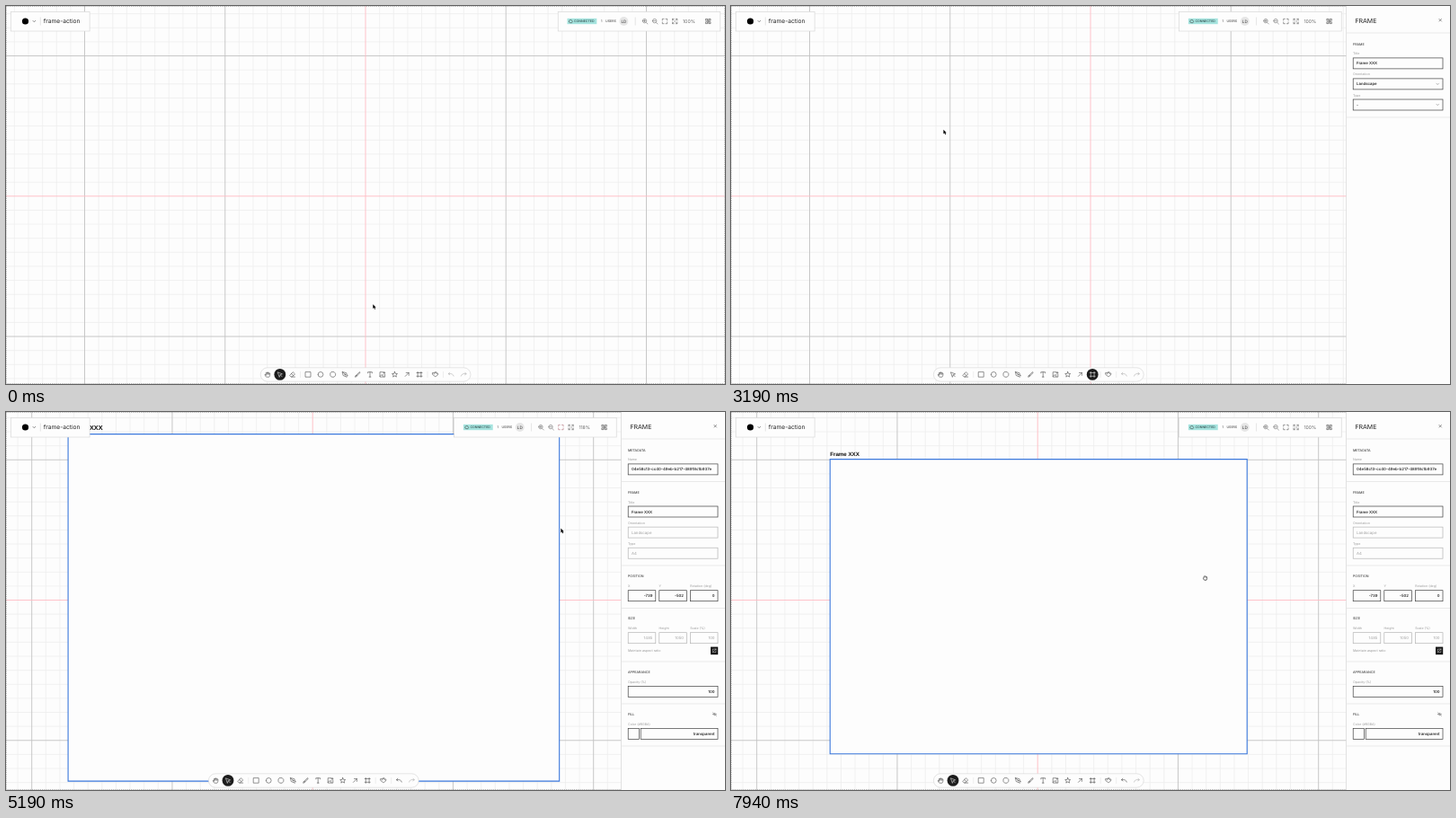
Animation of 800x421 px, one loop 8 s. Source, as an HTML page:

```html
<!DOCTYPE html>
<html lang="en">
<head>
<meta charset="utf-8">
<title>Frame action</title>
<style>
  html, body { margin: 0; width: 100%; height: 100%; overflow: hidden; background: #fdfdfd; }
  svg { display: block; width: 100vw; height: 100vh; }
  text { font-family: Inter, "Open Sans", sans-serif; text-rendering: geometricPrecision; white-space: pre; }
  .icon { fill: none; stroke-width: .52; stroke-linecap: round; stroke-linejoin: round; }
</style>
</head>
<body>
<svg id="stage" viewBox="0 0 800 421"></svg>
<script>
const LOOP = 8000;
const OPEN = 1940, PLACE = 3880, FIT = 5060, ZOOM_OUT = 7370, GRAB = 7940;
const DARK = '#333', GREY = '#9a9a9a', EDGE = '#d2d2d2', PAPER = '#fdfdfd';
const CELL = 15.625, FIT_SCALE = 1.178;

const text = (x, y, s, size, fill = DARK, extra = '') =>
  `<text x="${x}" y="${y + size * .36}" font-size="${size}" fill="${fill}" ${extra}>${s}</text>`;
const box = (x, y, w, h, stroke = EDGE, fill = PAPER, sw = .6, r = 0) =>
  `<rect x="${x}" y="${y}" width="${w}" height="${h}" rx="${r}" fill="${fill}" stroke="${stroke}" stroke-width="${sw}"/>`;
const line = (d, stroke = EDGE, sw = .6) => `<path d="${d}" fill="none" stroke="${stroke}" stroke-width="${sw}"/>`;
const icon = (x, y, d, stroke = DARK, id = '') =>
  `<path ${id && `id="${id}"`} class="icon" transform="translate(${x} ${y})" stroke="${stroke}" d="${d}"/>`;
const group = (id, body) => `<g id="${id}">${body}</g>`;

// Canvas grid, centred on the origin
function grid() {
  let minor = '', major = '';
  for (let i = -60; i <= 60; i++) {
    if (!i) continue;
    const p = i * CELL, d = `M${p} -900V900M-900 ${p}H900`;
    if (i % 10) minor += d; else major += d;
  }
  return line(minor, '#eee', .8) + line(major, '#c2c2c2', .9) + line('M0 -900V900M-900 0H900', '#ffbcc3', .9);
}

const frame =
  `<rect x="-231" y="-156.9" width="464" height="328.1" fill="${PAPER}" stroke="#3a77dc" stroke-width="1.1" vector-effect="non-scaling-stroke"/>
   <text x="-231" y="-160.8" font-size="6.2" font-weight="700" fill="#111" style="font-family:'Liberation Sans',sans-serif">Frame XXX</text>`;

const ring = r => `M${-r} 0a${r} ${r} 0 1 0 ${2 * r} 0a${r} ${r} 0 1 0 ${-2 * r} 0`;
const lens = 'M1.7 1.7L3 3M-2.6 -.4a2.2 2.2 0 1 0 4.4 0a2.2 2.2 0 1 0 -4.4 0M-1.4 -.4H.6';
const corners = 'M-2.7 -1V-2.7H-1M1 -2.7H2.7V-1M2.7 1V2.7H1M-1 2.7H-2.7V1';

const tools = [
  [291, 'M-1.7 .6L-2.8 -.2C-3.3 .4 -2.2 2 -1.4 2.8H1.8C2.7 1.8 2.8 .2 2.7 -1.4Q2.2 -2 1.7 -1.4V0M-1.7 .6V-2Q-1.2 -2.6 -.6 -2V-.2M-.6 -2Q0 -3.4 .6 -2.3V-.2M.6 -2.2Q1.3 -2.7 1.7 -1.6'],
  [304.8, 'M-2.2 -2.4L2.6 -.6L.4 .3L-.5 2.6ZM.5 .5L2.3 2.4'],
  [318.7, 'M-2.8 .8L.5 -2.7L2.8 -.5L-.3 2.6H-1.2ZM-1.2 -.9L1.1 1.3M-1 2.7H2.8'],
  [336.2, 'M-2.8 -2.8H2.8V2.8H-2.8Z'],
  [350, ring(2.9)],
  [363.7, 'M-1.4 -2.8H1.4L2.9 -1V1L1.4 2.8H-1.4L-2.9 1V-1Z'],
  [377.3, 'M-2.8 -2.8L1.3 -1.8L2.2 .7L.7 2.2L-1.8 1.3ZM-2.8 -2.8L0 0M2.4 .9L3 1.6L1.6 3L.9 2.4M-.2 .1a.5 .5 0 1 0 1 0a.5 .5 0 1 0 -1 0'],
  [391.2, 'M-1.2 .6L2 -2.7Q3 -2.8 2.7 -1.8L-.5 1.3ZM-1.4 .8Q-2.6 .8 -2.8 2.8Q-.8 2.8 -.6 1.5'],
  [405, 'M-2.4 -1.6V-2.7H2.4V-1.6M0 -2.7V2.7M-.9 2.7H.9'],
  [418.8, 'M.6 -2.7H-2.8V2.7H2.8V-.4M-2.6 2L-.9 .2L1.4 2.6M2 -3V-1M1 -2H3M.4 .4H1'],
  [432.5, 'M0 -3L.9 -1L3 -.8L1.4 .6L1.9 2.7L0 1.6L-1.9 2.7L-1.4 .6L-3 -.8L-.9 -1Z'],
  [446.2, 'M-2 2L2 -2M-1 -2H2V1'],
  [460, 'M-1.9 -3V3M1.9 -3V3M-3 -1.9H3M-3 1.9H3'],
  [477.7, 'M-2.9 -1.8H.6L2.9 .2L.6 2.2H-.4L-2.9 .2ZM-1.6 -.6H-1.2M-.6 -2.6H1.4L3.2 -.6'],
  [495.2, 'M-1.6 -2.2L-2.9 -.7L-1.4 .4M-2.8 -.7Q2 -1.8 2.9 1.7'],
  [509.2, 'M1.6 -2.2L2.9 -.7L1.4 .4M2.8 -.7Q-2 -1.8 -2.9 1.7']
];
const SELECT = 1, FRAME = 12, UNDO = 14, REDO = 15;

const toolbar =
  box(283.2, 402.8, 233.8, 15.4, EDGE, PAPER, .6, 7.7) +
  line('M327.5 407V414M469 407V414M486.5 407V414', '#dedede', .5) +
  `<circle id="hover" cx="460" cy="410.5" r="6" fill="#e4e4e4"/><circle id="active" cy="410.4" r="6.4" fill="#1c1c1c"/>` +
  tools.map(([x, d], i) => icon(x, 410.4, d, DARK, 'tool' + i)).join('');

const nameBar =
  box(5.5, 6.3, 87.6, 21.7) +
  `<circle cx="21.5" cy="17" r="3.6" fill="#000"/>` +
  icon(31.3, 17, 'M-1.4 -.7L0 .8L1.4 -.7') + line('M38.3 12.5V21.5', '#d4d4d4') +
  text(41.8, 17, 'frame-action', 6.65, '#222');

const statusBar =
  box(614.2, 6.3, 180.6, 21.7) +
  `<rect x="624.5" y="13.8" width="32.8" height="6.4" fill="#a5e3de"/>` +
  icon(628.4, 17, 'M-1.3 1.5Q-2.4 1.2 -2 -.1Q-1.5 -1.7 0 -1.6Q1.4 -1.5 1.5 -.2Q2.6 .8 1.4 1.5Z') +
  text(632, 17, 'CONNECTED', 3.55, '#2d4a4a', 'font-weight="500"') +
  text(662, 17, '1', 3.6) + text(667, 17, 'USERS', 3.6) +
  `<circle cx="687.4" cy="17" r="4.9" fill="#e6e6e6"/>` +
  text(687.4, 17, 'LD', 4.6, '#333', 'text-anchor="middle"') +
  line('M700.2 12.5V21.5', '#d4d4d4') +
  icon(710.9, 17, lens + 'M-.4 -1.4V.6', '#555') + icon(722, 17, lens, '#555') +
  icon(733, 17, corners, '#444', 'fitIcon') +
  icon(744.2, 17, corners + 'M-2.5 -2.5L-.7 -.7M2.5 -2.5L.7 -.7M2.5 2.5L.7 .7M-2.5 2.5L-.7 .7', '#555') +
  text(753, 17, '100%', 5.2, '#666', 'id="percent"') +
  icon(781.4, 17, 'M-2.6 -2.6H-.8V-.8H-2.6ZM.8 -2.6H2.6V-.8H.8ZM.8 .8H2.6V2.6H.8ZM-2.6 .8H-.8V2.6H-2.6ZM-.8 -.8L.8 .8M.8 -.8L-.8 .8');

const tooltip = (id, x, y, label, key) => group(id,
  box(x, y, 35.6, 9.6) + text(x + 4, y + 4.9, label, 3.9, '#444') +
  text(x + 31.6, y + 4.9, key, 3.7, GREY, 'text-anchor="end"'));

// Side panel parts
const head = (y, s) => text(692, y, s, 3.7, '#222');
const rule = y => line(`M685 ${y}H800`, '#dcdcdc');
function field(x, w, y, label, value, { off, right, select } = {}) {
  const ink = off ? '#a2a2a2' : '#111';
  const style = (right ? 'text-anchor="end" ' : '') + (off ? '' : 'font-weight="500"');
  return text(x, y, label, 3.6, GREY) +
    box(x + .2, y + 4.7, w - .4, 12, off ? '#b0b0b0' : DARK, PAPER, .65) +
    text(right ? x + w - 3.6 : x + 4, y + 10.7, value, 4.32, ink, style) +
    (select ? icon(x + w - 6, y + 10.7, 'M-1.3 -.7L0 .7L1.3 -.7', '#777') : '');
}
const full = (y, label, value, opt) => field(692, 100.2, y, label, value, opt);
const trio = (y, labels, values, off) => labels.map((s, i) =>
  field(692 + i * 34.6, 31, y, s, values[i], { off, right: true })).join('');

const panel =
  box(684.6, -1, 117, 423, EDGE) + text(694.4, 16, 'FRAME', 7, '#222') +
  icon(789.2, 15.7, 'M-1.3 -1.3L1.3 1.3M1.3 -1.3L-1.3 1.3') + rule(30) +
  group('draft',
    head(42.3, 'FRAME') + full(53.2, 'Title', 'Frame XXX') +
    full(76.2, 'Orientation', 'Landscape', { select: true }) + full(99.3, 'Type', '-', { select: true }) + rule(124)) +
  group('props',
    head(42.3, 'METADATA') + full(53.2, 'Name', '04e58c13-cc40-49eb-b217-48918c1b937e') + rule(77.5) +
    head(89.5, 'FRAME') + full(100.3, 'Title', 'Frame XXX') +
    full(123.4, 'Orientation', 'Landscape', { off: true }) + full(146.5, 'Type', 'A4', { off: true }) + rule(171) +
    head(183, 'POSITION') + trio(194, ['X', 'Y', 'Rotation (deg)'], ['-739', '-502', '0']) + rule(218.5) +
    head(230, 'SIZE') + trio(241, ['Width', 'Height', 'Scale (%)'], ['1485', '1050', '100'], true) +
    text(692, 265.8, 'Maintain aspect ratio', 3.7, GREY) +
    `<rect x="784" y="261.6" width="8.2" height="8.6" fill="#111"/>` +
    icon(788.1, 265.9, 'M.3 -1.8H-1.9V1.8H1.8V.3M-.8 .7L2 -2M.8 -2H2V-.8', '#ddd') + rule(278) +
    head(290, 'APPEARANCE') + full(300.8, 'Opacity (%)', '100', { right: true }) + rule(325) +
    head(337, 'FILL') + icon(788.5, 336.6, 'M-2.2 0Q0 -2.6 2.2 0Q0 2.6 -2.2 0M-.7 0a.7 .7 0 1 0 1.4 0a.7 .7 0 1 0 -1.4 0M-2 -2L2 2', '#777') +
    field(706, 86.2, 347.8, '', 'transparent', { right: true }) + text(692, 347.8, 'Color (#RGBA)', 3.6, GREY) +
    box(692.2, 352.5, 12.3, 12, DARK, PAPER, .65) + rule(372));

const pointers =
  `<path id="arrow" d="M0 0V4.9L1.1 3.9L1.9 5.6L2.8 5.2L2 3.6H3.4Z" fill="#000" stroke="#fff" stroke-width=".5" paint-order="stroke"/>` +
  `<path id="fist" d="M-1.9 -.2L-1.7 -1.5Q-1.1 -2.3 -.6 -1.8Q0 -2.5 .6 -1.8Q1.3 -2.2 1.7 -1.3Q2.3 .4 1.3 2.2H-1.1Q-2.7 .7 -1.9 -.2ZM-.6 -1.4V-.6M.6 -1.4V-.6" fill="#fff" stroke="#222" stroke-width=".7"/>`;

const stage = document.getElementById('stage');
stage.innerHTML =
  `<rect width="800" height="421" fill="${PAPER}"/>` + group('grid', grid()) + group('frame', frame) +
  `<rect x=".4" y=".4" width="799.2" height="420.2" fill="none" stroke="#8c8c8c" stroke-width=".7" stroke-dasharray="1.2 1"/>` +
  nameBar + group('status', statusBar) + group('tools', toolbar) + group('panel', panel) +
  tooltip('tipFrame', 442.3, 392.2, 'Add a frame', 'F') + tooltip('tipZoom', 573.5, 25.2, 'Zoom out', '⌘ -') +
  group('pointer', pointers);

const $ = {};
stage.querySelectorAll('[id]').forEach(n => $[n.id] = n);
const move = (n, x, y = 0, s = 1) => n.setAttribute('transform', `translate(${x} ${y}) scale(${s})`);
const show = (n, on) => n.setAttribute('display', on ? 'inline' : 'none');

// Pointer stops: time, x, y
const stops = [
  [0, 408.3, 332.2], [60, 408.3, 332.2], [1380, 459.2, 411.6], [2060, 459.2, 411.6], [2480, 430, 382],
  [3190, 236.4, 137.7], [3300, 236.4, 137.7], [3630, 169, 55], [3880, 169, 55], [4440, 464.2, 119.8],
  [4620, 464.2, 119.8], [4750, 617.4, 129.6], [5940, 617.4, 129.6], [6600, 605, 17], [6880, 599.2, 19.2],
  [7130, 605, 18], [7840, 605, 18], [7940, 527.7, 185], [8000, 527.7, 185]
];
function pointerAt(t) {
  const i = stops.findIndex(s => s[0] > t), [t0, x0, y0] = stops[i - 1], [t1, x1, y1] = stops[i];
  const u = (t - t0) / (t1 - t0), k = u * u * (3 - 2 * u);
  return [x0 + (x1 - x0) * k, y0 + (y1 - y0) * k];
}

function update(t) {
  const open = t >= OPEN, placed = t >= PLACE, panned = t >= FIT, zoomed = panned && t < ZOOM_OUT;
  const cx = panned ? 341.2 : 400, cy = panned ? 209.5 : 211.8;
  const [px, py] = pointerAt(t);
  const overFrame = !open && Math.hypot(px - 460, py - 411) < 7;

  move($.grid, cx, cy);
  move($.frame, cx, cy, zoomed ? FIT_SCALE : 1);
  show($.frame, placed);

  move($.status, open ? -115.6 : 0);
  $.percent.textContent = zoomed ? '118%' : '100%';
  $.fitIcon.setAttribute('stroke', panned && t < 6300 ? '#a8606a' : '#444');
  show($.panel, open);
  show($.draft, !placed);
  show($.props, placed);

  const active = open && !placed ? FRAME : SELECT;
  move($.tools, open ? -57.8 : 0);
  $.active.setAttribute('cx', tools[active][0]);
  tools.forEach((_, i) => {
    const faded = i === REDO || i === UNDO && !placed;
    $['tool' + i].setAttribute('stroke', i === active ? '#fff' : faded ? '#a5a5a5' : DARK);
  });
  show($.hover, overFrame);
  show($.tipFrame, overFrame);
  show($.tipZoom, t >= 6600 && t < 7880);

  move($.pointer, px, py);
  show($.arrow, t < GRAB);
  show($.fist, t >= GRAB);
}

const start = performance.now();
function tick() {
  update((performance.now() - start) % LOOP);
  requestAnimationFrame(tick);
}
tick();
</script>
</body>
</html>
```
